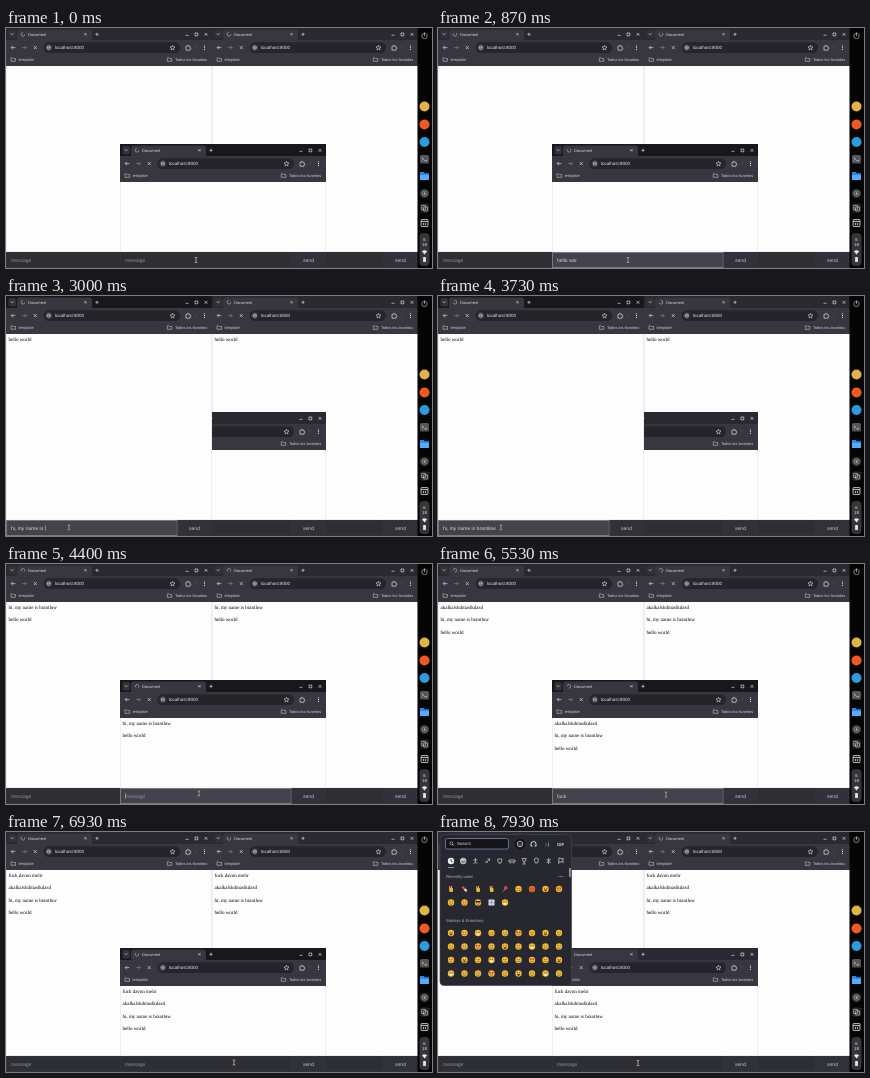
These frames come from a looping animation (426 by 240 pixels, 8000 ms). An HTML page with a canvas:

```html
<!DOCTYPE html>
<html lang="en">
<head>
<meta charset="utf-8">
<title>Chat windows</title>
<style>
html, body { margin: 0; width: 100%; height: 100%; overflow: hidden; background: #000; }
canvas { display: block; width: 100vw; height: 100vh; }
</style>
</head>
<body>
<canvas></canvas>
<script>
const LOOP = 8000, W = 426, H = 240, WIN = 206;
const SANS = '"Liberation Sans", Arial, sans-serif';
const SERIF = '"Liberation Serif", "Times New Roman", serif';
const canvas = document.querySelector('canvas');
const c = canvas.getContext('2d');

// Each message: window, focus time, typing start and end, send time.
const posts = [
  { from: 'popup', focus: 70, start: 130, end: 1050, send: 1200, text: 'hello world' },
  { from: 'left', focus: 1550, start: 1670, end: 3750, send: 3930, text: 'hi, my name is brantlow' },
  { from: 'popup', focus: 4270, start: 4470, end: 5000, send: 5130, text: 'akalkalskdmaslkdasd' },
  { from: 'popup', focus: 5140, start: 5200, end: 6600, send: 6730, text: 'fuck davon melir' }
];
const pointer = [
  [0, 190, 232], [1250, 190, 232], [1530, 63, 231.5], [3960, 63, 231.5],
  [4250, 193, 229.5], [4500, 193, 229.5], [5100, 228, 230.5],
  [6950, 228, 230.5], [7400, 200, 231], [LOOP, 200, 231]
];
const PANEL_AT = 7500;

function rect(x, y, w, h, fill, r = 0, stroke) {
  c.beginPath();
  c.roundRect(x, y, w, h, r);
  if (fill) { c.fillStyle = fill; c.fill(); }
  if (stroke) { c.strokeStyle = stroke; c.lineWidth = .7; c.stroke(); }
}
function disc(x, y, r, fill) {
  c.fillStyle = fill;
  c.beginPath();
  c.arc(x, y, r, 0, 7);
  c.fill();
}
function ring(x, y, r, stroke, width = .6, from = 0, to = Math.PI * 2) {
  c.strokeStyle = stroke;
  c.lineWidth = width;
  c.beginPath();
  c.arc(x, y, r, from, to);
  c.stroke();
}
function path(d, x, y, stroke, width = .7, fill) {
  c.save();
  c.translate(x, y);
  const p = new Path2D(d);
  if (fill) { c.fillStyle = fill; c.fill(p); }
  if (stroke) { c.strokeStyle = stroke; c.lineWidth = width; c.stroke(p); }
  c.restore();
}
function text(s, x, y, size, fill, family = SANS, align = 'left', weight = 400) {
  c.font = `${weight} ${size}px ${family}`;
  c.textRendering = 'geometricPrecision';
  c.textAlign = align;
  c.fillStyle = fill;
  c.fillText(s, x, y);
}
const cross = (x, y, r, color) => path(`M${-r} ${-r}L${r} ${r}M${r} ${-r}L${-r} ${r}`, x, y, color);
const folder = (x, y) => path('M-2.2-1.7h1.6l.7.7h2.2v2.8h-4.5z', x, y, '#c2c2c9', .6);

function browser(x, y, focused, messages, draft, active, t) {
  const light = '#d9d9df', dim = '#85858e', tool = '#383740', barFill = '#2e2e35';
  c.save();
  c.beginPath();
  c.rect(x, y, WIN, H - y);
  c.clip();
  c.translate(x, y);

  // tab strip
  rect(0, 0, WIN, 14, focused ? '#18181c' : '#292932');
  rect(11, 1.5, 75, 14, tool, 3);
  rect(2.5, 2, 7.5, 8.5, '#33323b', 2);
  path('M-1.3-.6L0 .8 1.3-.6', 6.2, 6, light);
  const spin = t / 1000 * Math.PI * 2;
  ring(17, 6.3, 1.8, '#a0a0a8', .8, spin, spin + 4.6);
  text('Document', 22, 7.9, 4, light);
  cross(79.5, 6.3, 1.1, light);
  path('M-1.6 0h3.2M0-1.6v3.2', 91, 6.3, light);
  path('M-1.5 1h3', 181, 6.3, light);
  rect(189, 5, 2.8, 2.8, null, 0, light);
  cross(200, 6.4, 1.4, light);

  // toolbar and bookmarks
  rect(0, 12, WIN, 26, tool);
  path('M2 0h-4M-.4-1.7L-2.1 0-.4 1.7', 7.3, 19.6, light);
  path('M-2 0h4M.4-1.7L2.1 0 .4 1.7', 18.2, 19.6, dim);
  cross(29.3, 19.6, 1.5, light);
  rect(37.5, 14.2, 136.5, 10.8, '#24242b', 5.4);
  disc(42.8, 19.6, 3.4, '#3f3e48');
  ring(42.8, 19.6, 1.6, light, .7);
  path('M-1.5 0h3', 42.8, 19.6, light, .5);
  text('localhost:8000', 49, 21.2, 4.5, '#e6e6ea');
  path('M0-2.4L.7-.7 2.5-.6 1.1.6 1.5 2.4 0 1.4-1.5 2.4-1.1.6-2.5-.6-.7-.7z', 166.5, 19.6, light, .6);
  path('M-2-1.4h1.2c0-1.5 1.5-1.5 1.5 0h1.3v1.2c1.2 0 1.2 1.4 0 1.4v1.3h-4z', 182, 19.7, light);
  path('M0-2.5v5', 190, 19.6, '#55545f', .5);
  for (let i = -1; i < 2; i++) disc(198.5, 19.6 + i * 1.8, .6, light);
  folder(7.2, 31.5);
  text('template', 12.5, 32.9, 4, '#cdcdd3');
  folder(163.5, 31.5);
  text('Todos los favoritos', 169, 32.9, 3.9, '#cdcdd3');

  // page
  rect(0, 38, WIN, 200, '#fdfdfd');
  messages.forEach((m, i) => text(m, 2.5, 44.9 + i * 12.45, 5, '#000', SERIF));
  path(`M.2 38V${H - y}M${WIN - .2} 38V${H - y}`, 0, 0, '#cfcfe2', .5);

  // message bar
  const bar = 224 - y;
  rect(0, bar, WIN, 16, barFill);
  rect(.4, bar + .4, 171, 15.2, active ? '#43434b' : barFill, 0, active ? '#a0a0a9' : '#37373f');
  rect(171.8, bar + .4, 33.9, 15.2, '#31313a', 0, '#383840');
  text(draft || 'message', 5, bar + 9.8, 5, draft ? '#d6d6db' : '#909098');
  if (active && t % 1000 < 500) {
    const end = 5.3 + (draft ? c.measureText(draft).width : 0);
    rect(end, bar + 5.2, .5, 5.6, '#d0d0d5');
  }
  text('send', 188.5, bar + 9.8, 5, '#c4c4cb', SANS, 'center');
  c.restore();
}

function dock() {
  rect(411.5, 0, 15, H, '#050506');
  const x = 418.5, pale = '#c5c5ca';
  ring(x, 8, 2.7, pale);
  path('M0-3.6V0', x, 8, pale);
  disc(x, 78.5, 5, '#dfb344');
  disc(x, 96.5, 5, '#f0591f');
  disc(x, 114, 5, '#2b9be0');
  rect(x - 4.5, 127, 9, 8.5, '#53575c', 1.5);
  path('M-2.5-1.5L-1 0-2.5 1.5M0 1.7h2.4', x, 131, '#e8e8e8');
  path('M-4.5-4h3.4l1.2 1.3h4.4v6.7h-9z', x, 148, null, 0, '#2c8cf0');
  rect(x - 4.5, 147, 9, 5, '#56adff', .7);
  disc(x, 165.5, 4.6, '#3c3b3d');
  ring(x, 165.5, 2.5, '#b8b3ac');
  disc(x, 165.5, 1, '#ded8d0');
  rect(x - 4.5, 175.5, 9, 9, '#29292d', 2);
  rect(x - 2.8, 177.5, 4, 4, null, .5, pale);
  rect(x - 1, 179, 4, 4, null, .5, pale);
  rect(x - 3.5, 191.5, 7, 7, '#202024', .8, '#f0f0f0');
  path('M-3.5-1.5h7M-1 0v2M1 0v2', x, 195, '#f0f0f0');
  rect(413.5, 205, 10, 33, '#35353a', 4);
  text('6', x, 212.5, 4.3, '#eee', SANS, 'center');
  text('18', x, 218.3, 4.3, '#eee', SANS, 'center');
  path('M-2.6-1.3Q0-3 2.6-1.3L0 2z', x, 224.5, null, 0, '#e6e6e6');
  rect(x - 1.4, 229, 2.8, 5, '#e6e6e6', .6);
}

function face(x, y, mood) {
  const ink = '#6b4415';
  disc(x, y, 3.2, mood === 'angry' ? '#e8682f' : '#f3ba36');
  if (mood === 'cool') {
    rect(x - 2.8, y - 1.6, 5.6, 1.6, '#26242a', .7);
  } else if (mood === 'love') {
    disc(x - 1.3, y - .8, 1, '#e43d4d');
    disc(x + 1.3, y - .8, 1, '#e43d4d');
  } else if (mood === 'wink') {
    path('M-1.8-.6h1.2M.6-.6h1.2', x, y, ink, .6);
  } else {
    disc(x - 1.1, y - .7, .5, ink);
    disc(x + 1.1, y - .7, .5, ink);
  }
  if (mood === 'grin') path('M-1.8 0h3.6q-.3 2-1.8 2T-1.8 0', x, y + .5, null, 0, '#fff2d8');
  else if (mood === 'open') path('M-1.6 0h3.2q-.3 2-1.6 2T-1.6 0', x, y + .5, null, 0, ink);
  else ring(x, y + .3, 1.6, ink, .5, .3, 2.84);
  if (mood === 'tear') disc(x + 2.3, y + .9, .9, '#58b8ef');
}

const symbols = {
  hand(x, y) {
    rect(x - 1.6, y - .9, 3.6, 3.9, '#f1b83c', 1);
    path('M-1 .8L-1.4-2.6M.4 .8V-3', x, y, '#f1b83c', 1.1);
  },
  pill(x, y) {
    path('M-2.2-2.2L0 0', x, y, '#dc4a42', 2.2);
    path('M0 0L2.2 2.2', x, y, '#f0dcc0', 2.2);
  },
  pin(x, y) {
    disc(x + .8, y - 1.1, 1.8, '#df3c45');
    path('M0 0L-2 2.6', x, y, '#b9b9c2');
  },
  grid(x, y) {
    rect(x - 3, y - 3, 6, 6, '#d8dce3', .6);
    path('M-3 0h6M0-3v6', x, y, '#8b8fa8', .8);
  }
};
function emoji(kind, x, y) {
  (symbols[kind] || ((a, b) => face(a, b, kind)))(x, y);
}

function emojiPanel() {
  const pale = '#d8d8df', label = '#b4b4bd', col = i => 13 + i * 13.5;
  rect(2, 2.5, 131.5, 151, '#26272f', 4, '#42424d');
  rect(7.5, 6.5, 63, 10.5, '#141419', 2, '#8791c4');
  ring(13.5, 11.3, 1.5, pale);
  path('M1 1L2.5 2.5', 13.5, 11.3, pale);
  text('Search', 19, 13.3, 4.4, pale);

  disc(82, 12, 5.2, '#101014');
  ring(82, 12, 2.8, pale, .8);
  path('M-1.3 .6Q0 2 1.3 .6M-1-1v.7M1-1v.7', 82, 12, pale, .6);
  path('M-2.5 2V0a2.5 2.5 0 0 1 5 0V2M-2.7 2h1.6M1.1 2h1.6', 95.5, 12, pale, 1);
  text(';-)', 109, 13.7, 5, pale, SANS, 'center');
  text('GIF', 122.5, 13.7, 4.3, pale, SANS, 'center', 700);

  const tabs = ['M0-2V0l1.5 1', 'M-1.6 .5Q0 2 1.6 .5', 'M0-3v4M-2-1h4M-2 3L0 1 2 3', 'M-2 2L2-2M0-2h2v2M-2 0L0 2',
    'M-2-2h4v2a2 2 0 0 1-4 0zM0 2v1', 'M-3 1V-1h6v2zM-2 2h1M1 2h1', 'M-2-2.5h4L1 .5h-2zM0 .5V3M-1.5 3h3',
    'M-2-1a2 2 0 1 1 4 0L1 2h-2z', 'M-2-2L2 2M2-2L-2 2M0-3v6', 'M-2 3V-3L3-2 1-.5 3 1-2 1'];
  tabs.forEach((d, i) => {
    const x = 13 + i * 12.2, solid = i < 2;
    if (solid) disc(x, 29, 3.2, i ? '#b8b8c2' : '#eeeef2');
    path(d, x, 29, solid ? '#282832' : '#c2c2cc', .8);
  });
  rect(10, 35, 6, .9, '#819bea');
  rect(131.3, 36, 1.2, 9, '#c9c9d2', .6);
  text('Recently used', 8, 46, 4.2, label);
  for (let i = 0; i < 3; i++) disc(121 + i * 1.8, 44.5, .5, label);

  ['hand', 'pill', 'hand', 'hand', 'pin', 'wink', 'angry', 'open', 'love']
    .forEach((kind, i) => emoji(kind, col(i), 57));
  ['smile', 'wink', 'cool', 'grid', 'grin'].forEach((kind, i) => emoji(kind, col(i), 70.5));

  text('Smileys & Emotions', 8, 90, 4.2, label);
  const moods = ['open', 'smile', 'grin', 'wink', 'tear', 'love', 'smile'];
  for (let row = 0; row < 4; row++)
    for (let i = 0; i < 9; i++)
      emoji(moods[(i + row * 3) % moods.length], col(i), 101 + row * 13.5);
}

function drawPointer(t) {
  const i = pointer.findIndex(p => p[0] > t);
  const [t0, x0, y0] = pointer[i - 1], [t1, x1, y1] = pointer[i];
  const k = (t - t0) / (t1 - t0), e = k * k * (3 - 2 * k);
  const x = x0 + (x1 - x0) * e, y = y0 + (y1 - y0) * e;
  const beam = 'M-1.3-2.7Q0-2.7 0-2 0-2.7 1.3-2.7M0-2V2M-1.3 2.7Q0 2.7 0 2 0 2.7 1.3 2.7';
  path(beam, x, y, '#17171b', 1.5);
  path(beam, x, y, '#f4f4f4', .7);
}

function draw(t) {
  const messages = posts.filter(p => t >= p.send).map(p => p.text).reverse();
  const current = posts.find(p => t >= p.focus && t < p.send);
  let draft = '';
  if (current && t >= current.start) {
    const part = (t - current.start) / (current.end - current.start);
    draft = current.text.slice(0, 1 + Math.floor(part * current.text.length));
  }
  const front = t >= 1550 && t < 4270 ? 'left' : 'popup';
  const panel = t >= PANEL_AT;
  const show = (name, x, y) => {
    const mine = current && current.from === name;
    browser(x, y, name === front && !panel, messages, mine ? draft : '', mine, t);
  };
  show('right', 206, 0);
  if (front === 'popup') { show('left', 0, 0); show('popup', 114, 116); }
  else { show('popup', 114, 116); show('left', 0, 0); }
  dock();
  if (panel) emojiPanel();
  drawPointer(t);
}

function resize() {
  const ratio = devicePixelRatio || 1;
  canvas.width = Math.round(innerWidth * ratio);
  canvas.height = Math.round(innerHeight * ratio);
}
const begin = performance.now();
function tick() {
  c.setTransform(canvas.width / W, 0, 0, canvas.height / H, 0, 0);
  draw((performance.now() - begin) % LOOP);
  requestAnimationFrame(tick);
}
addEventListener('resize', resize);
resize();
tick();
</script>
</body>
</html>
```
